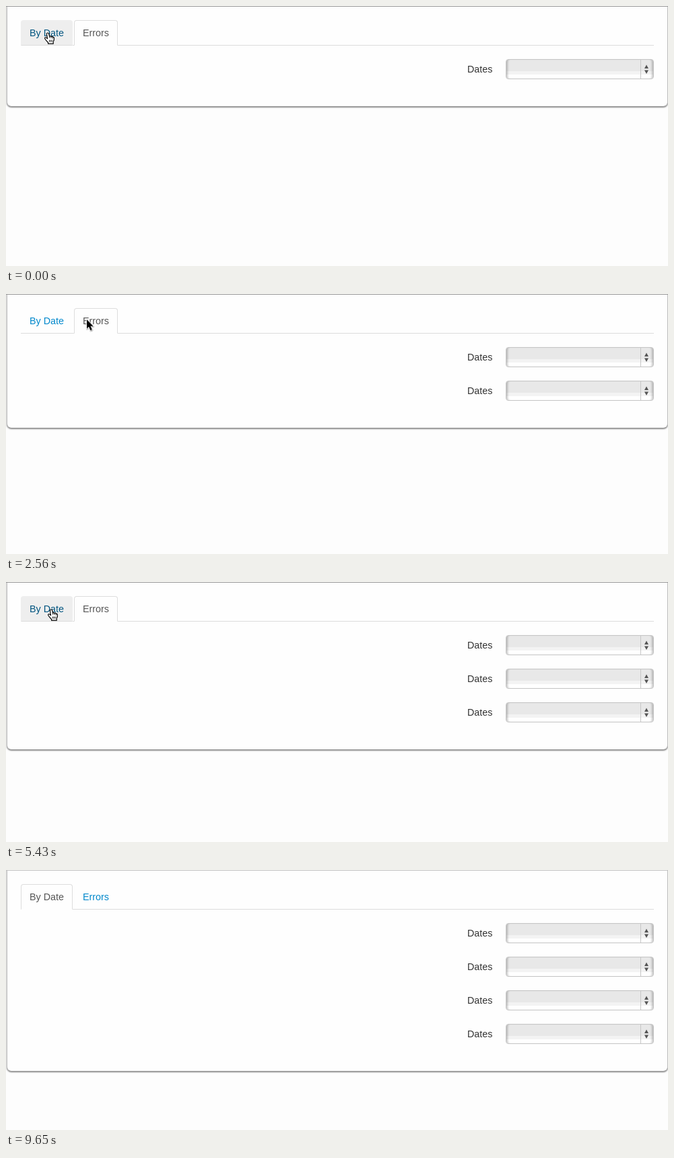
An HTML page that plays this animation: 983 px wide and 387 px high, repeating every 9.8 s.

```html
<!DOCTYPE html>
<html lang="en">
<head>
<meta charset="utf-8">
<title>Tabs</title>
<style>
* { box-sizing: border-box; }
html, body { margin: 0; width: 100%; height: 100%; overflow: hidden; }
body { position: relative; background: #fdfdfd; color: #333; cursor: default;
  font: 14.3px/20px "Liberation Sans", Arial, sans-serif; }
body * { position: absolute; }
#panel { left: 1px; top: -10px; width: 982px; background: #fefefe;
  border: 1px solid #bbb; border-bottom-color: #a0a0a0; border-radius: 7px;
  box-shadow: 0 1px 2px rgba(0, 0, 0, .5); }
#edge { left: 0; top: 0; width: 983px; height: 1px; }
#rule { left: 22px; top: 58px; width: 940px; height: 1px; background: #ddd; }
.tab { top: 21px; height: 38px; padding: 8px 12px; white-space: nowrap; color: #08c;
  border: 1px solid transparent; border-radius: 4px 4px 0 0; }
.tab.hover { color: #005580; background: #eee; border-color: #eee #eee #ddd; }
.tab.active { color: #555; background: #fefefe; border-color: #ddd #ddd #fefefe; }
.row { left: 685px; line-height: 30px; }
.select { left: 57px; top: 0; width: 220px; height: 30px; border: 1px solid #c6c6c6; border-radius: 4px;
  background: linear-gradient(#e8e8e8 17px, #f3f3f3 17px 22px, #fff 22px);
  box-shadow: inset 4px 0 3px -2px rgba(0, 0, 0, .22), inset -4px 0 3px -2px rgba(0, 0, 0, .22); }
.select svg { right: 0; top: 0; width: 19px; height: 28px; }
#cursor { left: 0; top: 0; width: 983px; height: 387px; }
</style>
</head>
<body>
<div id="panel"></div>
<div id="edge"></div>
<div id="rule"></div>
<div class="tab" style="left:22px;width:77px">By Date</div>
<div class="tab" style="left:101px;width:65px">Errors</div>
<svg id="cursor" stroke-linejoin="round">
  <g id="arrow">
    <path d="M0 0V13.5L3 10.8L5.3 16L7.8 15L5.5 9.8H9.5Z" stroke="#000" stroke-opacity=".15" stroke-width="3" transform="translate(.4 1)"/>
    <path d="M0 0V13.5L3 10.8L5.3 16L7.8 15L5.5 9.8H9.5Z" stroke="#fff" stroke-width="1.6" paint-order="stroke"/>
  </g>
  <g id="hand" stroke="#000" stroke-width="1.2">
    <path fill="#fff" d="M-1.6 1.5Q-1.5 0 0 0Q1.4 0 1.7 1.5L2.5 5Q3.8 4.2 4.9 5.5Q6.4 4.7 7.3 6.2Q9 5.8 9.4 7.5Q9.8 11 8.2 13V16.2H.6V14.5Q-2.4 11.6 -4 9Q-4.9 7.4 -3.7 6.8Q-2.3 6.5 -.5 8.5Z"/>
    <path fill="none" stroke-width=".9" d="M2.5 5V7.5M4.9 5.5V8M7.3 6.2V8.5M2.5 10.5V13.5M4.4 10.5V13.5M6.3 10.5V13.5"/>
  </g>
</svg>
<script>
const LOOP = 9800;
const $ = id => document.getElementById(id);
const tabs = [...document.querySelectorAll('.tab')];
const spans = [[22, 99], [101, 166]];

// first step time, last step time, step count, destination
const moves = [
  [90, 90, 1, 60, 40],
  [810, 1410, 8, 133, 38],
  [2390, 2920, 7, 68, 40],
  [3820, 4180, 5, 115, 41],
  [5070, 5430, 5, 67, 41],
  [7140, 7140, 1, 102, 62],
  [7230, 7400, 3, 347, 231],
  [7670, 7850, 3, 733, 373],
  [8120, 8210, 2, 739, 390]
];
const clicks = [360, 1670, 3190, 4350, 6240];

const rows = [0, 1, 2, 3].map(i => {
  const row = document.createElement('div');
  row.className = 'row';
  row.style.top = 79 + 50 * i + 'px';
  row.innerHTML = 'Dates<div class="select"><svg><path d="M.5 0V28" stroke="#c6c6c6"/>' +
    '<path d="M6 13L9 7.5L12 13ZM6 15.5L9 21L12 15.5Z" fill="#555"/></svg></div>';
  document.body.insertBefore(row, $('cursor'));
  return row;
});

function pointer(t) {
  let x = 62, y = 40;
  for (const [start, end, n, toX, toY] of moves) {
    if (t < start) break;
    const gap = (end - start) / (n - 1) || 1;
    const u = Math.min(n, Math.floor((t - start) / gap + 1.001)) / n;
    const ease = u * u * (3 - 2 * u);
    x += (toX - x) * ease;
    y += (toY - y) * ease;
  }
  return [Math.round(x), Math.round(y)];
}

function draw(now) {
  const t = now % LOOP;
  const done = clicks.filter(c => t >= c).length;
  const active = done % 2 ? 0 : 1;
  const count = 1 + Math.ceil(done / 2);
  const [x, y] = pointer(t);
  const over = y >= 21 && y < 59 ? spans.findIndex(([a, b]) => x >= a && x < b) : -1;
  const linked = over >= 0 && over !== active;

  tabs.forEach((tab, i) => {
    tab.classList.toggle('active', i === active);
    tab.classList.toggle('hover', linked && i === over);
  });
  rows.forEach((row, i) => row.style.display = i < count ? '' : 'none');
  $('panel').style.height = 110 + 50 * count + 'px';
  $('edge').style.background = t < 9650 ? '#999' : '#c4c4c4';
  $('arrow').style.display = linked ? 'none' : '';
  $('hand').style.display = linked ? '' : 'none';
  for (const id of ['arrow', 'hand']) $(id).setAttribute('transform', `translate(${x} ${y})`);
}

const begin = performance.now();
function tick() {
  draw(performance.now() - begin);
  requestAnimationFrame(tick);
}
tick();
</script>
</body>
</html>
```
